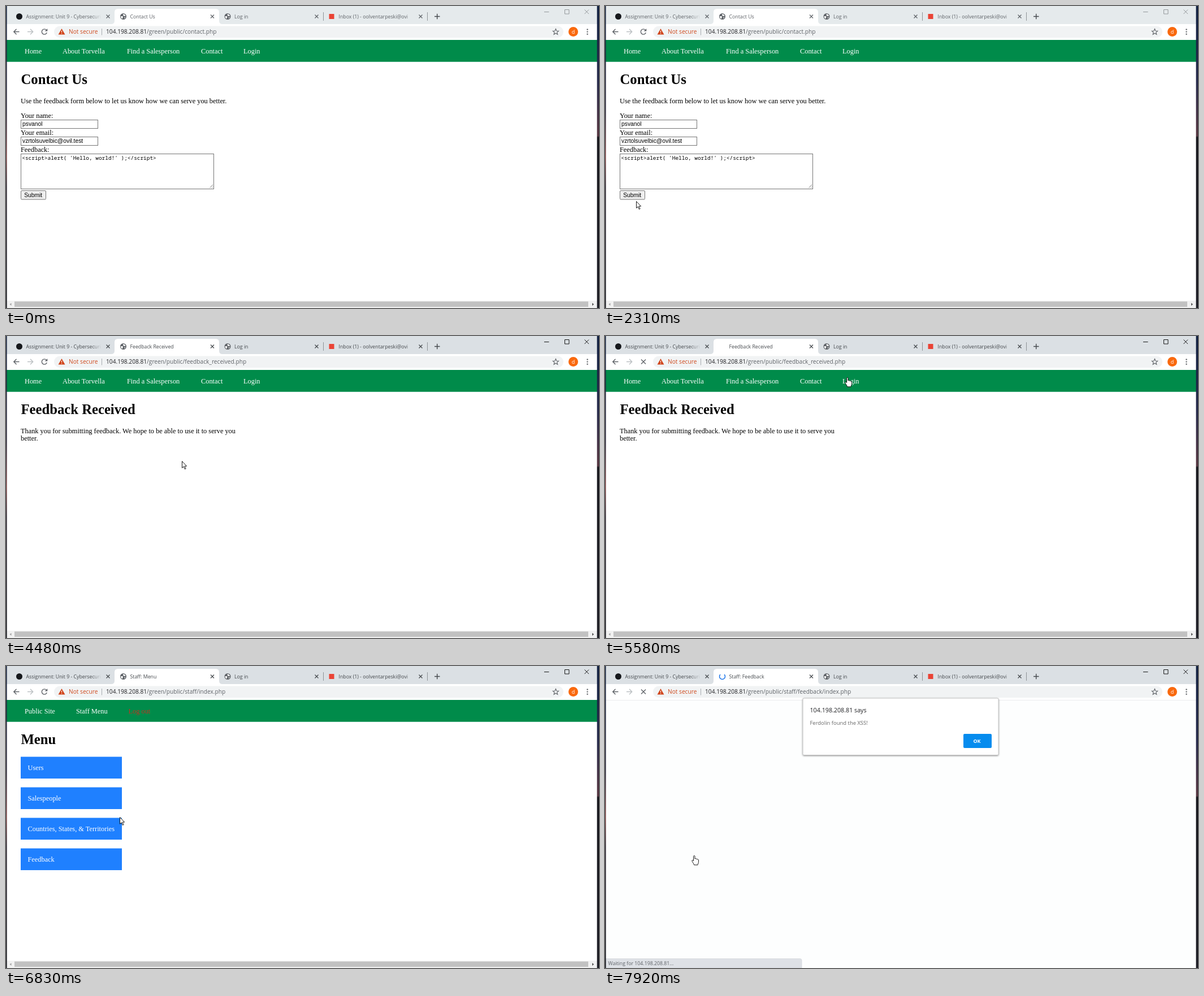
Animation, 1049 px wide and 534 px high, one loop 8 s. Source, as an HTML page:

```html
<!DOCTYPE html>
<html lang="en">
<head>
<meta charset="utf-8">
<title>Feedback form demo</title>
<style>
  html, body { margin: 0; width: 100%; height: 100%; overflow: hidden; background: #fff; }
  svg { display: block; --strip: #e5eaec; --label: #5f6368; --control: #8b8f92; }
  svg.active { --strip: #dbe0e4; --label: #45494d; --control: #000; }
  text { white-space: pre; }
  .ui { font-family: "Open Sans", "Noto Sans", sans-serif; }
  .small { font-size: 8.75px; }
  .tab { fill: var(--label); }
  .bar { font-size: 10.18px; fill: #5f6368; }
  .page text { font: 12.35px "Liberation Serif", "Times New Roman", serif; }
  .page .title { font-size: 24.7px; font-weight: bold; }
  .page .field { font: 10.3px "Liberation Sans", Arial, sans-serif; }
  .page .code { font: 9.44px "Noto Sans Mono", "DejaVu Sans Mono", monospace; }
  .page .light { fill: #fff; }
  .line { fill: none; stroke: #5f6368; stroke-width: 1.4; }
  .ctl { fill: none; stroke: var(--control); stroke-width: .9; }
  .box { fill: #fff; stroke: #767676; stroke-width: 1; }
  .pointer { fill: #fff; stroke: #000; stroke-width: .9; stroke-linejoin: round; }
</style>
</head>
<body>
<svg id="stage" width="1049" height="534" viewBox="0 0 1049 534">
  <defs>
    <linearGradient id="edgeL" x2="0" y2="1">
      <stop offset="0" stop-color="#1b2742"/><stop offset=".35" stop-color="#2a2738"/>
      <stop offset=".5" stop-color="#7a4444"/><stop offset=".6" stop-color="#2c2630"/>
      <stop offset="1" stop-color="#15161c"/>
    </linearGradient>
    <linearGradient id="edgeR" x2="0" y2="1">
      <stop offset="0" stop-color="#101f40"/><stop offset=".25" stop-color="#25294a"/>
      <stop offset=".43" stop-color="#55343f"/><stop offset=".435" stop-color="#15151b"/>
      <stop offset="1" stop-color="#1c1c24"/>
    </linearGradient>
    <linearGradient id="fadeA" gradientUnits="userSpaceOnUse" x1="152" x2="169" y1="0" y2="0">
      <stop style="stop-color:var(--label)"/><stop offset="1" style="stop-color:var(--label)" stop-opacity="0"/>
    </linearGradient>
    <linearGradient id="fadeB" gradientUnits="userSpaceOnUse" x1="706" x2="724" y1="0" y2="0">
      <stop style="stop-color:var(--label)"/><stop offset="1" style="stop-color:var(--label)" stop-opacity="0"/>
    </linearGradient>
    <filter id="shadow" x="-5%" y="-10%" width="110%" height="125%">
      <feDropShadow dx="0" dy="1" stdDeviation="1.5" flood-opacity=".45"/>
    </filter>
    <g id="globe">
      <circle r="5.5" fill="#5f6368"/>
      <path d="M-4.3-.6L-1.2-.4L-.2 1.2L-1.4 2.1V4.2C-3.4 3.6-4.6 1.6-4.3-.6ZM.2-4.2C2.2-4 3.5-2.8 4.1-1.2L2.4-.3L.4-1.3L-.8-2.6ZM2 1.4L3.9 1.2C3.5 2.4 2.8 3.2 1.8 3.8Z" fill="#fff"/>
    </g>
    <path id="cross" d="M-3-3L3 3M3-3L-3 3"/>
  </defs>

  <rect width="1049" height="534" fill="#fff"/>
  <g id="page" class="page"></g>

  <g id="scrollbar">
    <rect x="2" y="521" width="1043" height="13" fill="#f1f1f1"/>
    <rect x="15" y="522.5" width="1015" height="9.5" fill="#c1c1c1"/>
    <path d="M9.5 525v5l-3-2.5z" fill="#a3a3a3"/>
    <path d="M1037 525v5l3-2.5z" fill="#505050"/>
  </g>

  <g class="ui">
    <rect width="1049" height="33" style="fill:var(--strip)"/>
    <rect y="32" width="1049" height="28" fill="#fff"/>
    <path d="M186 32Q192 32 192 26V11Q192 5 198 5H371Q377 5 377 11V26Q377 32 383 32Z" fill="#fff"/>

    <circle cx="23.5" cy="18.5" r="5.5" fill="#16181c"/>
    <text x="35.5" y="21.7" class="small" fill="url(#fadeA)">Assignment: Unit 9 - Cybersecuri</text>
    <text id="tabTitle" x="219.5" y="21.7" class="small tab"></text>
    <text x="404" y="21.7" class="small tab">Log in</text>
    <text x="588.5" y="21.7" class="small" fill="url(#fadeB)">Inbox (1) - oolventarpeski@ovi</text>
    <use id="tabGlobe" href="#globe" x="207.5" y="18.5"/>
    <path id="spinner" d="M0-5A5 5 0 1 1-5 0" fill="none" stroke="#1a73e8" stroke-width="1.5"/>
    <use href="#globe" x="392" y="18.5"/>
    <rect x="571.5" y="14" width="9" height="9" fill="#ea4335"/>
    <g id="closers" stroke-width="1.2" style="stroke:var(--label)"></g>
    <path d="M561.5 11V26M745.5 11V26" stroke="#8d9296" fill="none"/>
    <path d="M758 18.5H767.5M762.7 13.8V23.2" stroke="#45494d" stroke-width="1.4"/>
    <path class="ctl" d="M952 10.5H960.5M988.5 6.5H996V14H988.5ZM1023.5 6.5L1031 14M1031 6.5L1023.5 14"/>

    <path class="line" d="M23.5 45.5H14M18.5 40.8L13.8 45.5L18.5 50.2"/>
    <path class="line" style="stroke:#bcc0c3" d="M38 45.5H47.5M43 40.8L47.7 45.5L43 50.2"/>
    <g id="reload"><path class="line" d="M71.5 42.6A4.6 4.6 0 1 0 72.3 47"/><path d="M73.3 40V44.6H68.7Z" fill="#5f6368"/></g>
    <path id="stop" class="line" d="M64 41.5L72 49.5M72 41.5L64 49.5"/>
    <rect x="85" y="35.5" width="901" height="20.5" rx="10.2" fill="#f1f3f4"/>
    <path d="M98.5 40L104.5 50.5H92.5Z" fill="#d0451b"/>
    <path d="M98.5 43.5V46.7M98.5 48V49.2" stroke="#fff" stroke-width="1.1"/>
    <text x="111" y="49.4" class="bar" style="fill:#cf4a1e">Not secure</text>
    <path d="M169.5 40V51.5" stroke="#a9adb1"/>
    <text x="177" y="49.4" class="bar"><tspan fill="#202124">104.198.208.81</tspan><tspan id="path"></tspan></text>
    <path class="line" style="stroke-width:1.1" d="M972.5 40.5L974 44L977.6 44.2L974.8 46.6L975.8 50.2L972.5 48.2L969.2 50.2L970.2 46.6L967.4 44.2L971 44Z"/>
    <circle cx="1003.5" cy="45.5" r="8.5" fill="#f9690e"/>
    <text x="1003.5" y="48.7" font-size="9" fill="#fff" text-anchor="middle">d</text>
    <g fill="#5f6368"><circle cx="1028.5" cy="41.5" r="1.2"/><circle cx="1028.5" cy="45.6" r="1.2"/><circle cx="1028.5" cy="49.7" r="1.2"/></g>
  </g>

  <g id="dialog" class="ui">
    <rect x="350" y="57" width="346" height="100.5" rx="2" fill="#fff" stroke="#b4b4b4" stroke-width=".8" filter="url(#shadow)"/>
    <text x="362.5" y="82" font-size="10.7" fill="#202124">104.198.208.81 says</text>
    <text x="362.5" y="104" font-size="9.45" fill="#666">Ferdolin found the XSS!</text>
    <rect x="634" y="120" width="50" height="25" rx="2" fill="#068cee"/>
    <text x="658" y="135.8" font-size="9" font-weight="bold" fill="#fff" text-anchor="middle">OK</text>
  </g>

  <g id="status" class="ui">
    <path id="statusBox" fill="#dee1e6" stroke="#cfd2d7" stroke-width=".6"/>
    <text id="statusText" x="5.5" y="529.3" class="small" fill="#5f6368"></text>
  </g>

  <rect width="1.6" height="534" fill="url(#edgeL)"/>
  <rect x="1045.5" width="3.5" height="534" fill="url(#edgeR)"/>

  <circle id="ring" r="8.8" fill="none" stroke="#fff" stroke-opacity=".6"/>
  <path id="arrow" class="pointer" d="M.5.5V12.3L3.2 9.8L5.3 14.4L7.1 13.6L5 9.1H8.6Z"/>
  <path id="hand" class="pointer" d="M-1.4 9.5V1.6C-1.4 0 1 0 1 1.6V6C1.4 5.2 3.2 5.3 3.4 6.4C4 5.7 5.4 6 5.6 7.1C6.5 6.5 7.5 7.2 7.5 8.3V11.5C7.5 13.5 6.2 14.5 6 16.8H-.4C-.6 14.6-3 12.6-4.1 9.7C-4.6 8.2-2.8 7.8-1.4 9.5Z"/>
</svg>
<script>
const LOOP = 8000;
const $ = id => document.getElementById(id);
const show = (id, on) => $(id).style.display = on ? '' : 'none';
const within = (t, a, b) => t >= a && t < b;
const put = (id, x, y) => $(id).setAttribute('transform', `translate(${x} ${y})`);
const label = (x, y, s, cls = '') => `<text x="${x}" y="${y}" class="${cls}">${s}</text>`;
const frame = (x, y, w, h) => `<rect class="box" x="${x + .5}" y="${y + .5}" width="${w}" height="${h}"/>`;

const BLOCKS = ['Users', 'Salespeople', 'Countries, States, &amp; Territories', 'Feedback'];
const blockTop = i => 160.5 + 54 * i;
const blockAt = (x, y) => BLOCKS.findIndex((_, i) =>
  within(x, 26, 205) && within(y, blockTop(i), blockTop(i) + 38.5));

const nav = items => '<rect y="60" width="1049" height="38.7" fill="#008b4a"/>' +
  items.map(([x, s]) => label(x, 84, s, 'light')).join('');
const publicNav = nav([[33, 'Home'], [100, 'About Torvella'], [214, 'Find a Salesperson'], [345, 'Contact'], [420, 'Login']]);
const staffNav = nav([[33, 'Public Site'], [124, 'Staff Menu']]) +
  '<text x="216.5" y="84" fill="#c23324">Log out</text>';
const heading = s => label(26.5, 137.5, s, 'title');

const PAGES = {
  contact: {
    title: 'Contact Us', path: '/green/public/contact.php',
    body: hover => publicNav + heading('Contact Us') +
      label(26, 171.5, 'Use the feedback form below to let us know how we can serve you better.') +
      label(26, 198, 'Your name:') + frame(26, 201, 136, 15) + label(29, 212.3, 'psvanol', 'field') +
      label(26, 228, 'Your email:') + frame(26, 231, 136, 15) + label(29, 242.3, 'vzrtolsuvelbic@ovil.test', 'field') +
      label(26, 258, 'Feedback:') + frame(26, 261, 341, 62) +
      label(28.3, 272.3, "&lt;script&gt;alert( 'Hello, world!' );&lt;/script&gt;", 'code') +
      '<path d="M360.5 321.5L366 316M364 321.5L366 319.5" stroke="#777" stroke-width=".9"/>' +
      `<rect x="26.5" y="326.5" width="44" height="15.5" rx="1.5" fill="${hover ? '#e5e5e5' : '#efefef'}" stroke="${hover ? '#4f4f4f' : '#767676'}"/>` +
      label(32.2, 338, 'Submit', 'field')
  },
  received: {
    title: 'Feedback Received', path: '/green/public/feedback_received.php',
    body: () => publicNav + heading('Feedback Received') +
      label(26, 171.5, 'Thank you for submitting feedback. We hope to be able to use it to serve you') +
      label(26, 185.3, 'better.')
  },
  menu: {
    title: 'Staff: Menu', path: '/green/public/staff/index.php',
    body: hover => staffNav + heading('Menu') + BLOCKS.map((s, i) =>
      `<rect x="26" y="${blockTop(i)}" width="179" height="38.5" fill="${hover === i ? '#1570e0' : '#1f80ff'}"/>` +
      label(38.5, blockTop(i) + 23.5, s, 'light')).join('')
  },
  blank: {
    title: 'Staff: Feedback', path: '/green/public/staff/feedback/index.php',
    body: () => '<rect y="59" width="1049" height="475" fill="#fdfefe"/>' +
      '<path d="M0 60H1049" stroke="#d9dcdf"/>'
  }
};

// Pointer moves: start, end, steps, final x, final y
const MOVES = [
  [370, 440, 2, 671, 420], [750, 830, 2, 399, 391], [1210, 1390, 3, 171, 405],
  [1610, 1680, 2, 70, 375], [1910, 2080, 3, 58, 356], [2310, 2310, 1, 55, 345],
  [2390, 2390, 1, 55, 344], [2620, 2770, 3, 52, 340], [4250, 4480, 4, 311, 221],
  [4650, 4800, 3, 473, 95], [4880, 5030, 3, 428, 67], [5580, 5660, 2, 429, 78],
  [6200, 6600, 6, 218, 233], [6830, 6830, 1, 201, 267], [6910, 7140, 4, 158, 335]
];

function pointer(t) {
  let x = 805, y = 466;
  for (const [a, b, n, toX, toY] of MOVES) {
    if (t < a) break;
    const k = t >= b ? 1 : (Math.floor((t - a) / (b - a) * (n - 1)) + 1) / n;
    x += (toX - x) * k;
    y += (toY - y) * k;
  }
  return { x: Math.round(x), y: Math.round(y) };
}

function statusAt(t) {
  const host = '104.198.208.81', base = `https://${host}/green/public/staff/`;
  const waiting = { text: `Waiting for ${host}...`, width: 348, alpha: 1 };
  if (within(t, 3166, 3700)) return waiting;
  if (within(t, 3700, 3870)) return { ...waiting, alpha: t < 3785 ? .67 : .33 };
  if (within(t, 5660, 5810)) return waiting;
  if (within(t, 5810, 6360)) return { text: base + 'index.php', width: 222, alpha: 1 };
  if (within(t, 7310, 7620)) return { text: base + 'feedback/index.php', width: 263, alpha: 1 };
  return t >= 7620 ? waiting : null;
}

let lastBody = '';
function draw(t) {
  const name = t < 3318 ? 'contact' : t < 5735 ? 'received' : t < 7690 ? 'menu' : 'blank';
  const page = PAGES[name], p = pointer(t);
  const block = t > 5735 ? blockAt(p.x, p.y) : -1;
  const body = page.body(name === 'menu' ? block : t >= 2690);
  if (body !== lastBody) $('page').innerHTML = lastBody = body;
  $('tabTitle').textContent = page.title;
  $('path').textContent = page.path;
  $('stage').classList.toggle('active', t >= 3090);
  show('scrollbar', name !== 'blank');
  show('dialog', t >= 7840);

  const loading = within(t, 3090, 3394) || within(t, 5580, 5890) || t >= 7386;
  show('reload', !loading);
  show('stop', loading);
  show('tabGlobe', !loading);
  show('spinner', loading && name === 'blank');
  $('spinner').setAttribute('transform', `translate(207.5 18.5) rotate(${(t - 7920) * .4 + 45})`);

  const s = statusAt(t);
  show('status', s);
  if (s) {
    $('status').style.opacity = s.alpha;
    $('statusText').textContent = s.text;
    $('statusBox').setAttribute('d', `M1 534V517.5H${s.width - 3}Q${s.width} 517.5 ${s.width} 520.5V534Z`);
  }

  const overLogin = within(p.x, 402, 468) && within(p.y, 60, 99);
  const hand = overLogin || block >= 0;
  show('arrow', t >= 370 && !hand);
  show('hand', hand);
  put('arrow', p.x, p.y);
  put('hand', p.x, p.y);
  show('ring', within(t, 5260, 5410));
  put('ring', 428.5, 67.5);
}

$('closers').innerHTML = [180.5, 365, 549.5, 733.5].map(x => `<use href="#cross" x="${x}" y="18.5"/>`).join('');

function tick() {
  draw(performance.now() % LOOP);
  requestAnimationFrame(tick);
}
tick();
</script>
</body>
</html>
```
